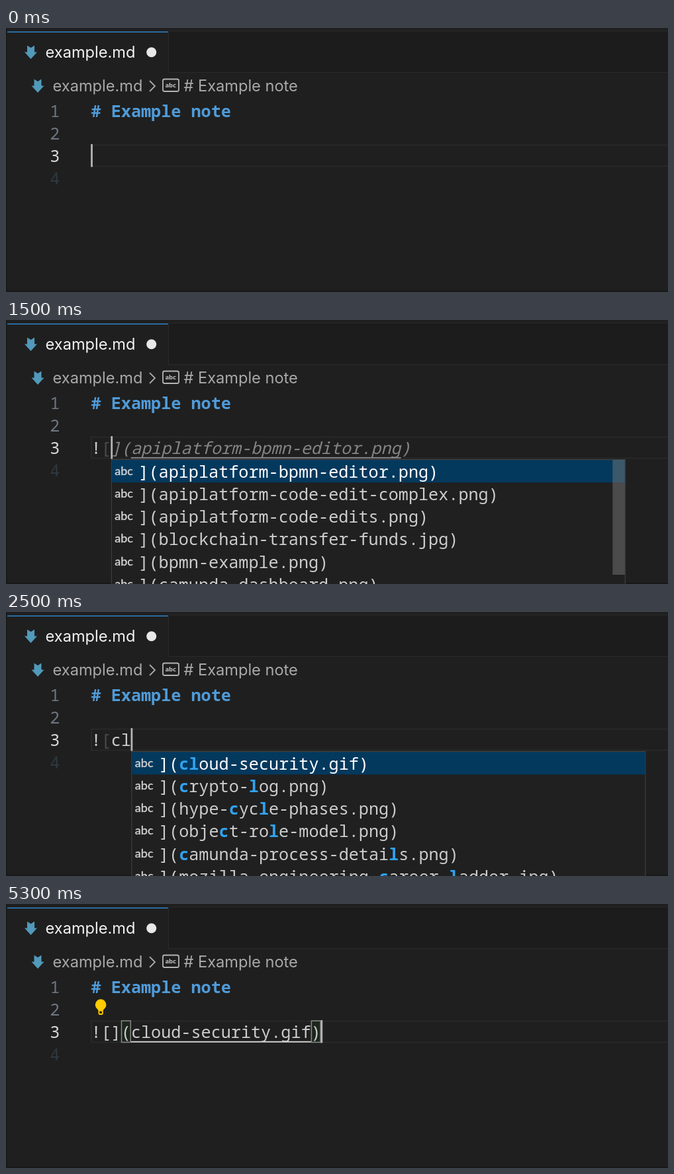
These frames come from a looping animation (1000x400 px, 6.5 s). An HTML page:

```html
<!DOCTYPE html>
<html lang="en">
<head>
<meta charset="utf-8">
<title>Image link completion</title>
<style>
  html, body { margin: 0; width: 100%; height: 100%; overflow: hidden; background: #1f1f1f; }
  svg { display: block; width: 1000px; height: 400px; }
  text { white-space: pre; }
  .code { font: 25.17px "Noto Sans Mono", monospace; fill: #ccc; }
  .ui { font: 23.6px Inter, sans-serif; fill: #a9a9a9; }
  .kind { font: 18px Lato, sans-serif; fill: #d4d4d4; stroke: #d4d4d4; stroke-width: .4px; }
  .num { fill: #6e7681; text-anchor: middle; }
  .hit { fill: #2fa3f2; font-weight: 700; }
  .ghost { fill: #858585; font-style: italic; }
</style>
</head>
<body>
<svg viewBox="0 0 1000 400">
  <defs>
    <path id="arrow" d="M4 0L9.5 3.5L15 0V10H19L9.5 20.5L0 10H4Z" fill="#519aba"/>
  </defs>
  <rect width="1000" height="400" fill="#1f1f1f"/>
  <rect x="246" y="5" width="754" height="62" fill="#1c1c1c"/>
  <path d="M246 4.5H1000M245.5 6V67.5H1000" fill="none" stroke="#2a2a2a"/>
  <rect x="2" y="5" width="243" height="2" fill="#2a6a9e"/>
  <path d="M.5 0V400M0 399H1000" stroke="#181818" stroke-width="2"/>

  <use href="#arrow" x="28" y="26.5"/>
  <text class="ui" x="59.6" y="45" style="fill:#f2f2f2">example.md</text>
  <circle cx="219.7" cy="36.7" r="7.5" fill="#e8e8e8"/>

  <use href="#arrow" x="38.5" y="77.5"/>
  <text class="ui" x="70.6" y="96">example.md</text>
  <path d="M217 80L225 88L217 96" fill="none" stroke="#a9a9a9" stroke-width="1.8"/>
  <rect x="237" y="77.5" width="24" height="18.5" rx="2.5" fill="none" stroke="#b4b4b4" stroke-width="1.8"/>
  <text x="249" y="90" text-anchor="middle" style="font:700 9.5px 'Noto Sans Mono',monospace;fill:#c4c4c4">abc</text>
  <text class="ui" x="268.4" y="96"># Example note</text>

  <text class="code" x="128.5" y="134.6" style="fill:#4f9bd9;font-weight:700"># Example note</text>
  <rect x="129" y="177.5" width="880" height="32" fill="none" stroke="#292929" stroke-width="2"/>
  <g class="code">
    <text class="num" x="73.7" y="134.6">1</text>
    <text class="num" x="73.7" y="168.8">2</text>
    <text class="num" x="73.7" y="203" style="fill:#d8d8d8">3</text>
    <text class="num" x="73.7" y="237.2" style="fill:#2f3940">4</text>
  </g>
  <g id="scene"></g>
</svg>
<script>
const LOOP = 6500, LEFT = 128.5, CELL = 15.1, ROW = 34.2, BASE = 203, ZOOM = 1.798;
const col = n => LEFT + n * CELL;

// An asterisk marks the next letter as a matched one.
const marked = s => s.replace(/\*(.)/g, '<tspan class="hit">$1</tspan>');
const code = (n, s, cls = '', style = '') =>
  `<text class="code ${cls}" x="${col(n)}" y="${BASE}" style="${style}">${s}</text>`;
const caret = n => `<rect x="${col(n) - 0.4}" y="176" width="2.8" height="34.5" fill="#b4b4b4"/>`;
const underline = (a, b, color) =>
  `<rect x="${col(a)}" y="207.8" width="${(b - a) * CELL}" height="2" fill="${color}"/>`;
const bracket = n =>
  `<rect x="${col(n) + 0.7}" y="177" width="13.7" height="32.5" fill="#006400" fill-opacity=".1" stroke="#888" stroke-width="1.5"/>`;
const dimOpen = code(1, '[', '', 'fill:#4a4a4a');

// The list opens on a whole editor pixel, so its left edge snaps to the zoom.
function popup(n, files, bar) {
  const x = (Math.floor(col(n) / ZOOM) + 0.6) * ZOOM, width = 776;
  const rows = files.map((file, i) => {
    const y = 238.8 + i * ROW;
    return `<text class="kind" x="${x + 5}" y="${y - 4}">abc</text>
      <text class="code" x="${x + 41.1}" y="${y}" ${i ? '' : 'style="fill:#fff"'}>](${marked(file)})</text>`;
  }).join('');
  const slider = bar
    ? `<rect x="${x + width - 19}" y="212" width="18.5" height="${bar}" fill="#797979" fill-opacity=".48"/>` : '';
  return `<rect x="${x}" y="211.5" width="${width}" height="220" fill="#202020" stroke="#454545"/>
    <rect x="${x + 0.5}" y="212" width="${width - 1}" height="${ROW}" fill="#04395e"/>${rows}${slider}`;
}

const bulb = `<path d="M139.5 162C139.5 159 134.8 158 134.8 152.5A8.3 8.3 0 0 1 151.4 152.5C151.4 158 146.7 159 146.7 162V165.5Q146.7 168 144.2 168H142Q139.5 168 139.5 165.5Z" fill="#fc0"/>
  <path d="M141.3 162.5H144.9V165.8H141.3Z" fill="#1f1f1f"/>`;

const scenes = [
  [0, caret(0)],
  [1000, code(0, '!') + caret(1)],
  [1500, code(0, '!') + dimOpen
    + code(2, '](apiplatform-bpmn-editor.png)', 'ghost') + underline(4, 31, '#858585') + caret(2)
    + popup(2, ['apiplatform-bpmn-editor.png', 'apiplatform-code-edit-complex.png',
      'apiplatform-code-edits.png', 'blockchain-transfer-funds.jpg',
      'bpmn-example.png', 'camunda-dashboard.png'], 174)],
  [2000, code(0, '!') + dimOpen + code(2, 'c') + caret(3)
    + popup(3, ['*camunda-dashboard.png', '*camunda-process-details.png',
      '*cloud-security.gif', '*crypto-log.png',
      'hype-*cycle-phases.png', 'do*cumentation.png'], 200)],
  [2500, code(0, '!') + dimOpen + code(2, 'cl') + caret(4)
    + popup(4, ['*c*loud-security.gif', '*crypto-*log.png',
      'hype-*cyc*le-phases.png', 'obje*ct-ro*le-model.png',
      '*camunda-process-detai*ls.png', 'mozilla-engineering-*career-*ladder.jpg'])],
  [3500, bulb + bracket(3) + bracket(22) + code(0, '![](cloud-security.gif)')
    + underline(4, 22, '#ccc') + caret(23)]
];

const stage = document.getElementById('scene');
let shown = null;
function draw() {
  const t = performance.now() % LOOP;
  const scene = scenes.findLast(([at]) => t >= at);
  if (scene !== shown) {
    stage.innerHTML = scene[1];
    shown = scene;
  }
  requestAnimationFrame(draw);
}
draw();
</script>
</body>
</html>
```
